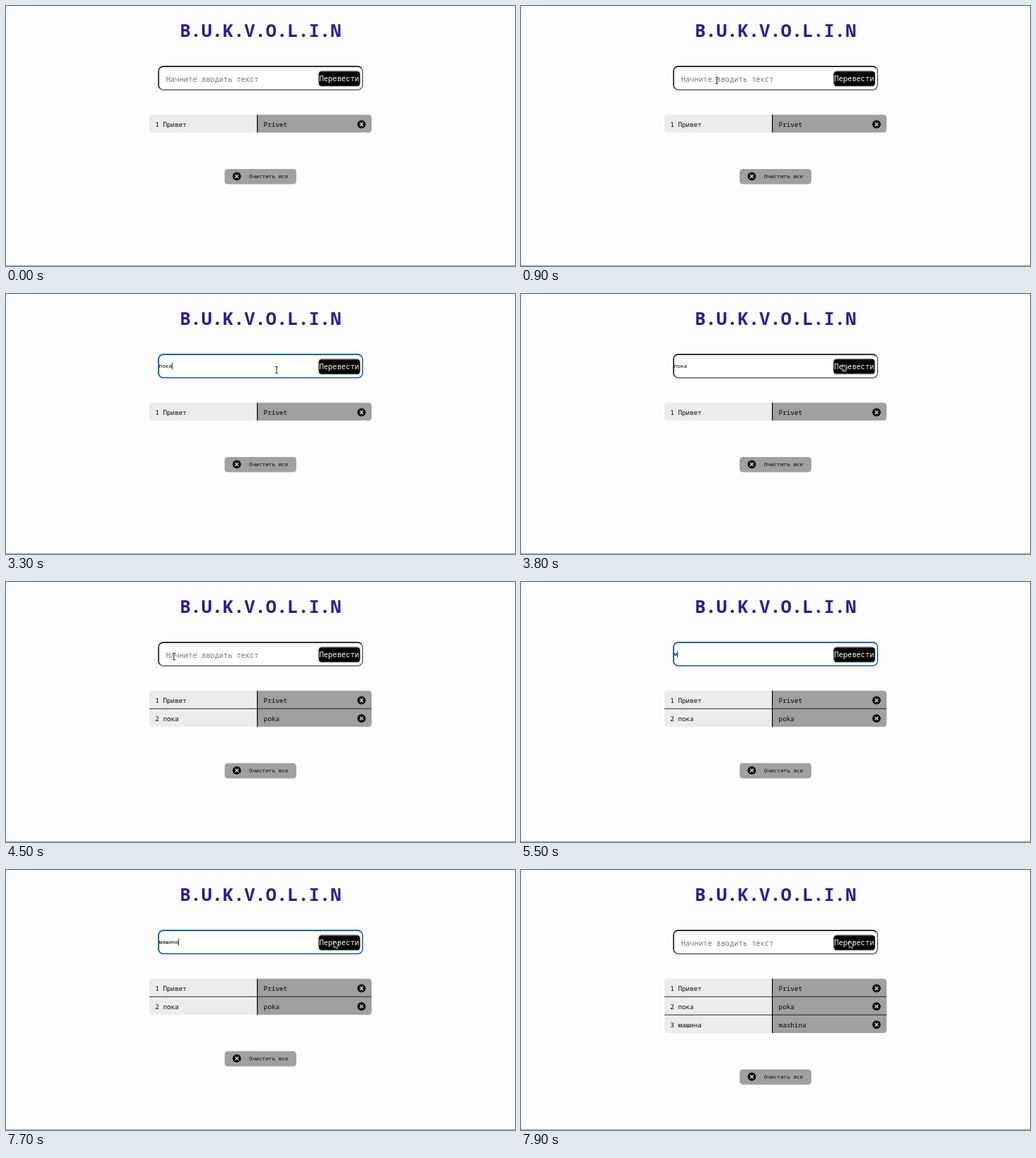
An HTML page with a canvas for the animation above (8000 ms loop, 724 by 370 pixels).

```html
<!DOCTYPE html>
<html lang="ru">
<head>
<meta charset="utf-8">
<title>B.U.K.V.O.L.I.N</title>
<style>
  html, body { margin: 0; width: 100%; height: 100%; overflow: hidden; background: #fdfdfd; }
  canvas { display: block; width: 724px; height: 370px; }
</style>
</head>
<body>
<canvas id="stage"></canvas>
<script>
const W = 724, H = 370, LOOP = 8000, STEP = 100;
const canvas = document.getElementById('stage');
const ctx = canvas.getContext('2d');
const ratio = window.devicePixelRatio || 1;
canvas.width = W * ratio;
canvas.height = H * ratio;

const MONO = '"Noto Sans Mono", "DejaVu Sans Mono", monospace';
const SMALL = 7.73, BODY = 9.28, LARGE = 10.44, TITLE = 25.5;
const ROW_TOP = 154.4, ROW_H = 25.9;
const FIELD = { x: 217, y: 86, w: 290.2, h: 33.3, r: 7 };
const BUTTON = { x: 445, y: 93, w: 58.2, h: 20.8, r: 3.5 };

// Each session: focus the field, type the word, press the button, get a row.
const sessions = [
  { focus: 1200, word: 'пока', keys: [2300, 2400, 2700, 2900], press: 3800, done: 3900 },
  { focus: 4900, word: 'машина', keys: [5500, 5600, 6000, 6300, 6600, 6700], press: 7800, done: 7900 }
];
const entries = [
  { from: 'Привет', to: 'Privet', at: 0 },
  { from: 'пока', to: 'poka', at: 3900 },
  { from: 'машина', to: 'mashina', at: 7900 }
];
// Pointer strokes: waypoints [time, x, y]; the pointer hides while typing.
const strokes = [
  { until: 2300, path: [[100, 502, 252], [200, 420, 175], [300, 329, 91], [500, 326, 92],
    [600, 310, 103], [700, 292, 110], [800, 281, 108], [900, 278.5, 106]] },
  { until: 5500, path: [[3000, 284, 106], [3300, 385, 108], [3600, 457.5, 101], [4200, 457.5, 101],
    [4300, 350, 102], [4400, 258, 105], [4500, 239, 106]] },
  { until: LOOP, path: [[7000, 246, 106], [7300, 340, 109], [7500, 435, 105], [7700, 467, 102]] }
];

function label(text, x, y, size, color = '#000', weight = 400) {
  ctx.font = `${weight} ${size}px ${MONO}`;
  ctx.fillStyle = color;
  ctx.fillText(text, x, y);
}

function roundBox({ x, y, w, h, r }) {
  ctx.beginPath();
  ctx.roundRect(x, y, w, h, r);
}

function line(points, color, width, close = false) {
  ctx.beginPath();
  points.forEach(([x, y]) => ctx.lineTo(x, y));
  if (close) ctx.closePath();
  ctx.strokeStyle = color;
  ctx.lineWidth = width;
  ctx.stroke();
}

// Border whose top-left and bottom-right halves differ, mitred at the corners.
function bevel(box, light, dark, width) {
  const { x, y, w, h } = box, m = h / 2;
  ctx.lineWidth = width;
  roundBox(box);
  ctx.strokeStyle = dark;
  ctx.stroke();
  ctx.save();
  ctx.beginPath();
  [[x - 2, y + h + 2], [x - 2, y - 2], [x + w + 2, y - 2], [x + w - m, y + m], [x + m, y + m]]
    .forEach(([px, py]) => ctx.lineTo(px, py));
  ctx.clip();
  roundBox(box);
  ctx.strokeStyle = light;
  ctx.stroke();
  ctx.restore();
}

function cross(x, y) {
  ctx.beginPath();
  ctx.arc(x, y, 5.9, 0, Math.PI * 2);
  ctx.fillStyle = '#000';
  ctx.fill();
  const d = 2.5;
  line([[x - d, y - d], [x + d, y + d]], '#fff', 1.2);
  line([[x - d, y + d], [x + d, y - d]], '#fff', 1.2);
}

function drawField(t) {
  const session = sessions.find(s => t >= s.focus && t < s.done);
  const focused = session && t < session.press;
  const typed = session ? session.keys.filter(k => k <= t) : [];

  roundBox(FIELD);
  ctx.fillStyle = '#fff';
  ctx.fill();
  if (focused) bevel(FIELD, '#0d58a8', '#0d58a8', 1.5);
  else bevel(FIELD, '#161616', '#4c4c4c', 1.3);

  if (typed.length) label(session.word.slice(0, typed.length), 217.6, 105.4, SMALL);
  else label('Начните вводить текст', 227.8, 108.2, LARGE, '#757575');

  if (focused) {
    const lastInput = typed.length ? typed[typed.length - 1] : session.focus;
    const lit = Math.floor((t - lastInput) / 500) % 2 === 0;
    const x = 217.8 + typed.length * SMALL * 0.6;
    if (lit) line([[x, 97.6], [x, 107.6]], '#000', 0.8);
  }

  const pressed = session && !focused;
  roundBox(BUTTON);
  ctx.fillStyle = '#000';
  ctx.fill();
  bevel(BUTTON, pressed ? '#111' : '#777', pressed ? '#777' : '#222', 1);
  label('Перевести', 445.8, 107.4, LARGE, '#fff');
}

function drawRows(rows) {
  const height = rows.length * ROW_H;
  ctx.save();
  roundBox({ x: 204, y: ROW_TOP, w: 316, h: height, r: 4.5 });
  ctx.clip();
  ctx.fillStyle = '#ececec';
  ctx.fillRect(204, ROW_TOP, 154, height);
  ctx.fillStyle = '#a0a0a0';
  ctx.fillRect(357, ROW_TOP, 163, height);
  rows.forEach((row, i) => {
    const y = ROW_TOP + i * ROW_H;
    if (i) line([[204, y], [520, y]], '#111', 0.9);
    label(`${i + 1} ${row.from}`, 212.3, y + 17.5, BODY);
    label(row.to, 366.6, y + 17.5, BODY);
    cross(505.7, y + 13.9);
  });
  line([[357.5, ROW_TOP], [357.5, ROW_TOP + height]], '#000', 1.2);
  ctx.restore();

  const top = ROW_TOP + height + 51.6;
  roundBox({ x: 311, y: top, w: 102, h: 21.7, r: 4.5 });
  ctx.fillStyle = '#a0a0a0';
  ctx.fill();
  cross(328.3, top + 10.4);
  label('Очистить все', 345.8, top + 13.1, SMALL);
}

function pointerAt(t) {
  const stroke = strokes.find(s => t >= s.path[0][0] && t < s.until);
  if (!stroke) return null;
  const { path } = stroke;
  const next = path.findIndex(p => p[0] > t);
  if (next < 0) return path[path.length - 1].slice(1);
  const [t0, x0, y0] = path[next - 1], [t1, x1, y1] = path[next];
  const k = (t - t0) / (t1 - t0);
  return [x0 + (x1 - x0) * k, y0 + (y1 - y0) * k];
}

function inside(x, y, box) {
  return x >= box.x && x <= box.x + box.w && y >= box.y && y <= box.y + box.h;
}

function drawPointer(t) {
  const spot = pointerAt(t);
  if (!spot) return;
  const [x, y] = spot;
  ctx.save();
  ctx.translate(x, y);
  if (inside(x, y, FIELD) && !inside(x, y, BUTTON)) {
    for (const [color, width] of [['#fff', 1.8], ['#111', 0.9]]) {
      line([[0, -4.3], [0, 4.3]], color, width);
      line([[-2, -5], [0, -4.3], [2, -5]], color, width);
      line([[-2, 5], [0, 4.3], [2, 5]], color, width);
    }
  } else {
    const arrow = [[0, 0], [0, 8], [1.9, 6.4], [3.2, 9.4], [4.6, 8.8], [3.3, 5.9], [5.8, 5.8]];
    line(arrow, '#fff', 1.3, true);
    ctx.fillStyle = '#000';
    ctx.fill();
  }
  ctx.restore();
}

function draw(t) {
  ctx.setTransform(ratio, 0, 0, ratio, 0, 0);
  ctx.fillStyle = '#fdfdfd';
  ctx.fillRect(0, 0, W, H);
  label('B.U.K.V.O.L.I.N', 247.2, 44.4, TITLE, '#32189b', 700);
  drawField(t);
  drawRows(entries.filter(e => e.at <= t));
  ctx.fillStyle = '#a2a2a2';
  ctx.fillRect(0, 369, W, 1);
  drawPointer(t);
}

const start = performance.now();
function tick() {
  const t = Math.max(0, performance.now() - start) % LOOP;
  draw(Math.floor(t / STEP) * STEP);
  requestAnimationFrame(tick);
}
tick();
</script>
</body>
</html>
```
